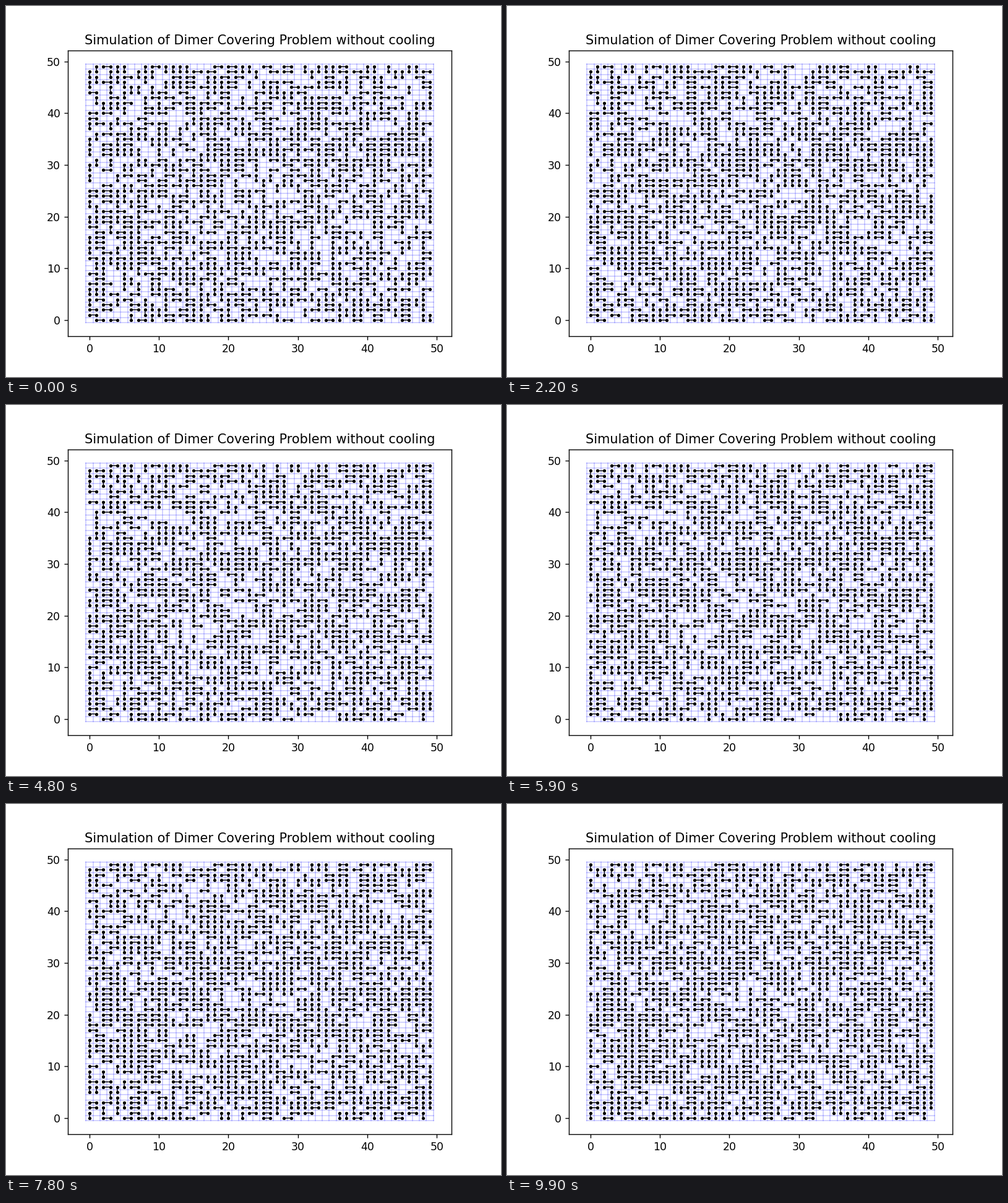
A matplotlib script for the animation above (10 s loop, 800 by 600 pixels).

```python
import math
import random

import matplotlib.pyplot as plt
import numpy as np
from matplotlib.animation import FuncAnimation

N = 50
FRAMES = 100
PICKS = 25          # bonds tried per frame
START = 905         # dimers on the lattice at the beginning
P_REMOVE = math.exp(-1)
STEPS = ((1, 0), (-1, 0), (0, 1), (0, -1))

rng = random.Random(7)
partner = {}        # occupied site -> other end of its dimer


def join(a, b):
    partner[a], partner[b] = b, a


def release(a):
    del partner[partner.pop(a)]


def try_bond():
    """One Metropolis move on a random lattice bond at constant temperature."""
    x, y = rng.randrange(N), rng.randrange(N)
    dx, dy = rng.choice(STEPS)
    a, b = (x, y), (x + dx, y + dy)
    if not (0 <= b[0] < N and 0 <= b[1] < N):
        return
    if a in partner and b in partner:
        if partner[a] == b and rng.random() < P_REMOVE:
            release(a)
        return
    for site in (a, b):
        if site in partner:
            release(site)
    join(a, b)


def polyline():
    """All dimers as one line, separated by gaps."""
    pts = []
    for a, b in partner.items():
        if a < b:
            pts += [a, b, (np.nan, np.nan)]
    return np.array(pts).T


def simulate():
    while len(partner) < 2 * START:
        try_bond()
    states = [polyline()]
    while len(states) < FRAMES:
        for _ in range(PICKS):
            try_bond()
        states.append(polyline())
    return states


states = simulate()

fig, ax = plt.subplots(figsize=(6.4, 4.8), dpi=125)
ax.set_title("Simulation of Dimer Covering Problem without cooling")

edges = np.arange(N + 1) - 0.5
low, high = -0.6, N - 0.4
grid = dict(colors="blue", linewidth=1, alpha=0.2)
ax.vlines(edges, low, high, **grid)
ax.hlines(edges, low, high, **grid)

pad = 0.05 * (high - low)
ax.set_xlim(low - pad, high + pad)
ax.set_ylim(low - pad, high + pad)

dimers, = ax.plot([], [], "ko-", linewidth=0.8, markersize=2)


def update(i):
    dimers.set_data(*states[i])
    return dimers,


anim = FuncAnimation(fig, update, frames=FRAMES, interval=100,
                     repeat=True, repeat_delay=0)
plt.show()
```
